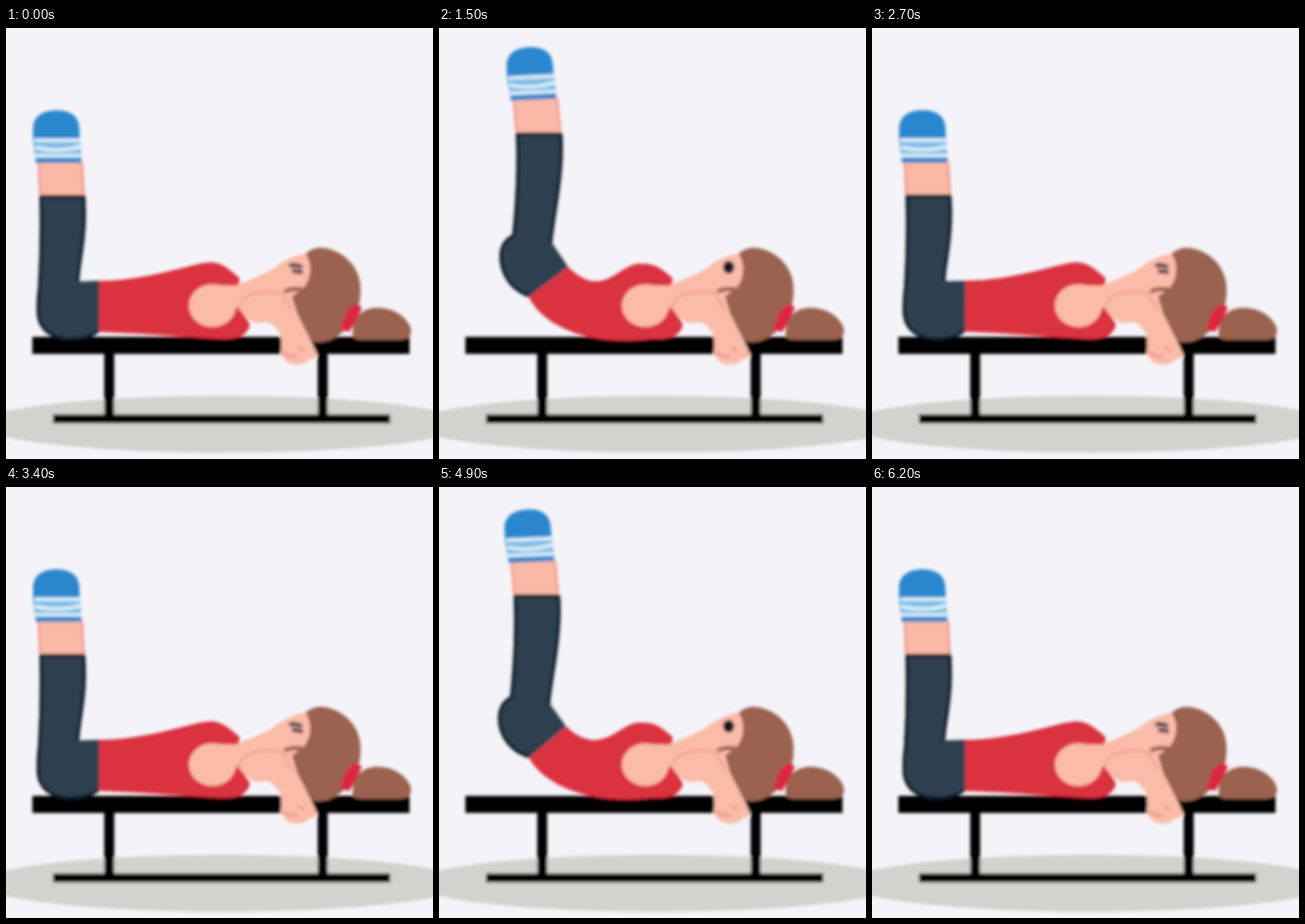
An HTML page that plays this animation: 600x607 px, repeating every 6300 ms.

```html
<!DOCTYPE html>
<html lang="en">
<head>
<meta charset="utf-8">
<title>Bench hip raise</title>
<style>
html, body { margin: 0; width: 100%; height: 100%; overflow: hidden; background: #f4f3f8; }
svg { display: block; width: 600px; height: 607px; }
</style>
</head>
<body>
<svg viewBox="0 0 600 607" xmlns="http://www.w3.org/2000/svg">
  <defs>
    <filter id="soft" filterUnits="userSpaceOnUse" x="-20" y="-20" width="640" height="647">
      <feGaussianBlur stdDeviation="2.1"/>
    </filter>
    <clipPath id="pants"><path id="pantsClip"/></clipPath>
  </defs>
  <rect width="600" height="607" fill="#f4f3f8"/>
  <g filter="url(#soft)">
    <ellipse cx="305" cy="558" rx="341" ry="40" fill="#d3d2ce"/>
    <path id="bench" d="M37 435H567V459H37ZM138 455H152V548H138ZM438 455H452V548H438ZM66 544H540V557H66Z"/>
    <path id="torso" fill="#db3040"/>

    <g id="foot">
      <path d="M45 186H107L111 238H47Z" fill="#f9b9a6"/>
      <path d="M46 190L48 234M107 190L109 234" stroke="#ee9485" stroke-width="3"/>
      <path d="M38 156V142C38 124 52 116 71 116S103 124 103 142L106 190H42Z" fill="#2b87cd"/>
      <path d="M40 156H104L105 182H41Z" fill="#7dbbe6"/>
      <path d="M40 158H104M41 168Q72 176 105 167M41 180H105" fill="none" stroke="#dff0fa" stroke-width="5"/>
    </g>
    <path id="legs" fill="#2e4150"/>
    <path id="legEdge" fill="none" stroke="#101c26" stroke-width="9" clip-path="url(#pants)"/>

    <g id="head">
      <path d="M487 433C486 408 500 394 522 394C546 394 566 409 569 425Q570 438 555 439H500Q488 439 487 433Z" fill="#9a6250"/>
      <path d="M318 365C340 355 364 347 378 337C392 325 410 319 432 315V375L412 395L425 432L437 459Q437 466 427 466Q420 475 408 474Q396 474 391 466Q384 460 387 448L386 432Q374 412 362 414C350 420 338 410 327 395L316 386Z" fill="#fabba8"/>
      <path d="M421 318C434 306 450 308 466 316C489 328 500 350 498 374C497 400 486 418 471 430C458 441 440 446 428 440L409 402L402 378L417 367Q426 357 427 345Q429 330 421 318Z" fill="#9a6250"/>
      <path d="M470 425C473 408 480 393 491 389L500 393C496 405 489 418 482 428Z" fill="#dc2840"/>
      <path d="M391 371Q403 366 416 368" fill="none" stroke="#a0604f" stroke-width="6"/>
      <path d="M327 395Q329 379 348 374Q372 369 388 374L402 398" fill="none" stroke="#f4a08e" stroke-width="3"/>
      <path d="M390 457Q399 464 409 462M411 450L419 455" fill="none" stroke="#ed8e82" stroke-width="3"/>
      <ellipse cx="290" cy="391" rx="33" ry="30" fill="#fabba8"/>
      <path d="M286 362L328 363L330 386L316 404Z" fill="#fabba8"/>
      <ellipse id="eyeOpen" cx="407" cy="337" rx="8" ry="9" fill="#1c1820"/>
      <path id="eyeShut" d="M398 335Q407 332 416 337M402 342L417 344" fill="none" stroke="#5b464f" stroke-width="6"/>
    </g>
  </g>
</svg>
<script>
const LOOP = 6300, STEP = 100;
const el = id => document.getElementById(id);

// Smooth 0..1 step between two times
function ramp(t, from, to) {
  const k = Math.min(1, Math.max(0, (t - from) / (to - from)));
  return k * k * (3 - 2 * k);
}

// Two raises per loop: 0 = resting, 1 = top
const liftAt = t =>
  ramp(t, 430, 1030) - ramp(t, 1780, 2730) +
  ramp(t, 3470, 4420) - ramp(t, 4790, 5590);

function draw(ms) {
  const p = liftAt(Math.floor(ms % LOOP / STEP) * STEP);
  // A point at rest, and how far it travels at full lift
  const pt = (x, y, dx, dy) => `${(x + dx * p).toFixed(2)} ${(y + dy * p).toFixed(2)} `;

  const ankle = pt(47, 235, 61, -88);
  const waistTop = pt(131, 356, 50, -20);
  const waistLow = pt(131, 428, -5, -49);
  const inner = `${pt(111, 235, 62, -88)}C${pt(116, 290, 62, -90)}${pt(104, 330, 59, -68)}${pt(103, 357, 56, -54)}`;
  const seat = `${waistLow}C${pt(112, 446, -12, -75)}${pt(43, 450, 42, -104)}${pt(43, 398, 42, -76)}` +
    `Q${pt(43, 380, 42, -80)}${pt(45, 365, 58, -74)}Q${pt(49, 300, 62, -88)}${ankle}`;
  const pants = `M${ankle}L${inner}L${waistTop}L${seat}Z`;
  el("legs").setAttribute("d", pants);
  el("pantsClip").setAttribute("d", pants);
  el("legEdge").setAttribute("d", `M${seat}L${inner}`);

  const back = `C${pt(250, 435, -36, 14)}${pt(190, 430, -42, -8)}${waistLow}`;
  const chest = `C${pt(200, 356, 31, 30)}${pt(265, 330, -12, 0)}${pt(288, 330, -5, 2)}`;
  el("torso").setAttribute("d",
    `M${waistTop}${chest}C306 331 316 342 328 352L326 390L342 416Q344 422 335 431Q327 439 300 438${back}Z`);

  el("foot").setAttribute("transform",
    `translate(${61 * p} ${-88 * p}) rotate(${-2.5 * p} 47 235)`);

  const shut = p < .05;
  el("eyeShut").setAttribute("visibility", shut ? "visible" : "hidden");
  el("eyeOpen").setAttribute("visibility", shut ? "hidden" : "visible");
}

const start = performance.now();
function tick() {
  draw(performance.now() - start);
  requestAnimationFrame(tick);
}
tick();
</script>
</body>
</html>
```
